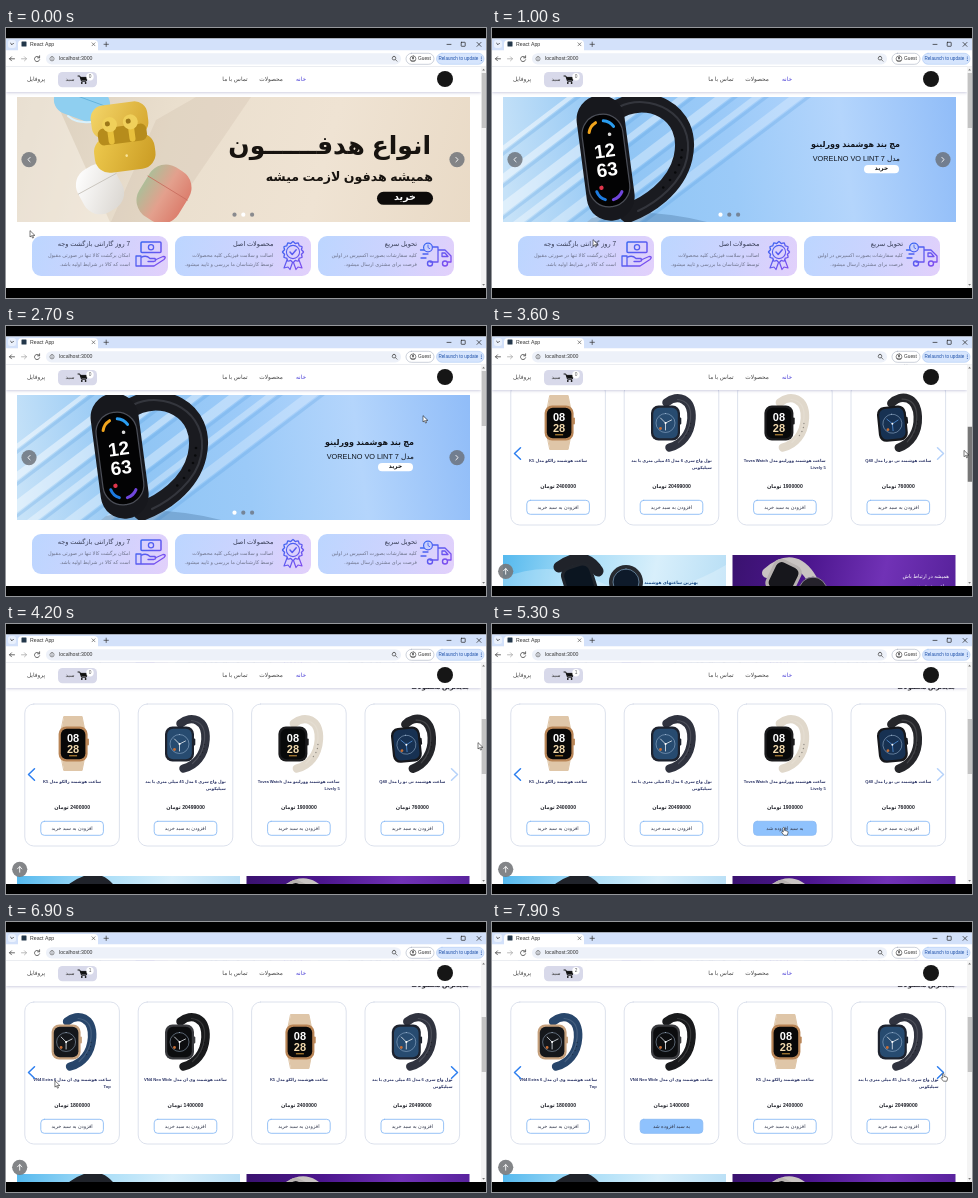
An HTML page with a canvas for the animation above (8000 ms loop, 480 by 270 pixels).

```html
<!DOCTYPE html>
<html lang="fa">
<head>
<meta charset="utf-8">
<title>React App</title>
<style>
html, body { margin: 0; width: 100%; height: 100%; overflow: hidden; background: #000; }
canvas { display: block; width: 480px; height: 270px; }
</style>
</head>
<body>
<canvas id="stage"></canvas>
<script>
const LOOP = 8000, STEP = 100, PITCH = 113.4;
const SANS = "'Liberation Sans', 'DejaVu Sans', sans-serif";
const canvas = document.getElementById('stage');
const c = canvas.getContext('2d');
const dpr = window.devicePixelRatio || 1;
canvas.width = 480 * dpr;
canvas.height = 270 * dpr;

// ---------- helpers ----------
const clamp = v => Math.max(0, Math.min(1, v));
const span = (t, a, b) => clamp((t - a) / (b - a));
const easeOut = p => 1 - Math.pow(1 - p, 2.1);
const smooth = p => p * p * (3 - 2 * p);

function track(keys, t) {
  let i = 0;
  while (i < keys.length - 2 && t >= keys[i + 1][0]) i++;
  const [a, b] = [keys[i], keys[i + 1]];
  const p = smooth(span(t, a[0], b[0]));
  return a.slice(1).map((v, k) => v + (b[k + 1] - v) * p);
}
function rect(x, y, w, h, fill) { c.fillStyle = fill; c.fillRect(x, y, w, h); }
function round(x, y, w, h, r, fill, stroke, lw = 0.8) {
  c.beginPath();
  c.roundRect(x, y, w, h, r);
  if (fill) { c.fillStyle = fill; c.fill(); }
  if (stroke) { c.strokeStyle = stroke; c.lineWidth = lw; c.stroke(); }
}
function disc(x, y, r, fill, stroke, lw = 0.8) { round(x - r, y - r, 2 * r, 2 * r, r, fill, stroke, lw); }
function path(d, stroke, lw, fill) {
  const p = new Path2D(d);
  if (fill) { c.fillStyle = fill; c.fill(p); }
  if (stroke) {
    c.strokeStyle = stroke; c.lineWidth = lw;
    c.lineCap = c.lineJoin = 'round';
    c.stroke(p);
  }
}
function text(s, x, y, size, color, align = 'center', weight = 400, dir = 'rtl') {
  c.font = `${weight} ${size}px ${SANS}`;
  c.direction = dir;
  c.textAlign = align;
  c.textBaseline = 'middle';
  c.fillStyle = color;
  c.fillText(s, x, y);
  return c.measureText(s).width;
}
function ramp(x0, y0, x1, y1, ...colors) {
  const g = c.createLinearGradient(x0, y0, x1, y1);
  colors.forEach((k, i) => g.addColorStop(i / (colors.length - 1), k));
  return g;
}
function at(x, y, angle, draw) {
  c.save();
  c.translate(x, y);
  c.rotate(angle);
  draw();
  c.restore();
}
function clipTo(x, y, w, h, draw) {
  c.save();
  c.beginPath();
  c.rect(x, y, w, h);
  c.clip();
  draw();
  c.restore();
}
function chevron(x, y, w, h, dir, color, lw) {
  path(`M${x + dir * -w / 2} ${y - h / 2}L${x + dir * w / 2} ${y}L${x + dir * -w / 2} ${y + h / 2}`, color, lw);
}

// ---------- browser ----------
function browser(scroll, dragging) {
  rect(0, 0, 480, 10.5, '#000');
  rect(0, 260, 480, 10, '#000');
  rect(0, 10.5, 480, 12, '#d3e1fa');
  round(2, 12, 8, 8, 2.5, '#eaf1fd');
  path('M4.6 15.3L6 16.7L7.4 15.3', '#222', 0.8);
  round(12, 12, 80, 12, [4, 4, 0, 0], '#fff');
  round(15.5, 13.5, 5, 5, 0.5, '#23374a');
  text('React App', 24, 16.4, 5.2, '#333', 'left', 400, 'ltr');
  path('M86 14.8l3 3m0 -3l-3 3', '#444', 0.6);
  path('M98 16.3h4.4m-2.2 -2.2v4.4', '#333', 0.7);
  path('M441 16.4h4', '#222', 0.7);
  round(455.2, 14.3, 4, 4, 0.4, null, '#222', 0.7);
  path('M471 14.4l4 4m0 -4l-4 4', '#222', 0.7);

  rect(0, 22.5, 480, 16, '#fff');
  path('M8.5 30.8h-5m2 -2l-2 2l2 2', '#444', 0.8);
  path('M15.5 30.8h5m-2 -2l2 2l-2 2', '#aaa', 0.8);
  path('M33.2 29.4a2.6 2.6 0 1 0 .4 2.4M33.6 27.8v2h-2', '#444', 0.8);
  round(40, 25.2, 355, 11.3, 5.6, '#edf1f9');
  disc(46, 30.8, 2.1, null, '#555', 0.6);
  path('M46 30.6v1.2', '#555', 0.6);
  text('localhost:3000', 53, 31, 5.2, '#333', 'left', 400, 'ltr');
  disc(388, 30.2, 1.8, null, '#444', 0.7);
  path('M389.4 31.6l1.6 1.6', '#444', 0.7);
  round(400, 25.3, 28, 11, 5.5, '#fff', '#aab2c2', 0.6);
  disc(407, 30.8, 2.9, null, '#333', 0.6);
  disc(407, 30, 0.9, '#333');
  path('M405.3 32.6q1.7 -1.5 3.4 0', '#333', 0.6);
  text('Guest', 412, 31, 4.8, '#333', 'left', 400, 'ltr');
  round(430.5, 25.3, 47.5, 11, 5.5, '#d6e5fd', '#9fc0f2', 0.5);
  text('Relaunch to update', 432.5, 31, 4.6, '#1c4fa8', 'left', 400, 'ltr');
  for (let i = -1; i < 2; i++) disc(475.3, 30.8 + i * 1.7, 0.5, '#1c4fa8');
  rect(0, 38, 480, 0.6, '#dfe3ea');

  rect(475, 38.5, 5, 221.5, '#f4f4f4');
  path('M476.2 42.6l1.4 -1.8l1.4 1.8z', null, 0, '#777');
  path('M476.2 256l1.4 1.8l1.4 -1.8z', null, 0, '#777');
  rect(475.7, 45 + scroll / 4, 4.3, 55, dragging ? '#777' : '#c3c3c3');
}

function navBar(count) {
  c.save();
  c.shadowColor = 'rgba(70,70,140,.35)';
  c.shadowBlur = 3 * dpr;
  c.shadowOffsetY = dpr;
  rect(0, 38.6, 475, 25.4, '#fff');
  c.restore();
  text('پروفایل', 30, 51, 5.8, '#444');
  round(52, 44, 39, 15.2, 4.5, '#d8d9ea');
  text('سبد', 64, 51.3, 5.4, '#333');
  path('M72 48h1.8l1.7 5.2h4.6l1.5 -3.8h-7.2', '#111', 1);
  path('M74.6 49.6h6.4l-1 2.8h-4.6z', null, 0, '#111');
  disc(75.8, 55, 0.9, '#111');
  disc(79.6, 55, 0.9, '#111');
  disc(84, 48.8, 3.7, '#fff');
  text(String(count), 84, 49.1, 4.8, '#555', 'center', 400, 'ltr');
  text('تماس با ما', 229, 51, 5.8, '#444');
  text('محصولات', 265, 51, 5.8, '#444');
  text('خانه', 295, 51, 5.8, '#4a3fd6');
  disc(439, 51, 8, '#161616');
}

// ---------- hero ----------
function earbudCase(x, y, angle, w, h, color, lid) {
  at(x, y, angle, () => {
    round(-w / 2, -h / 2, w, h, Math.min(w, h) * 0.42, color);
    path(`M${-w / 2} ${-h * 0.12}h${w}`, lid, 0.8);
  });
}
function earbudSlide() {
  rect(11, 69, 453, 125, ramp(11, 69, 464, 194, '#d9cdbb', '#eadfce', '#efe3d3', '#e9dac6'));
  path('M11 69H48L104 194H11z', null, 0, 'rgba(255,250,242,.4)');
  path('M150 92L190 69H245L160 194H105z', null, 0, 'rgba(190,172,148,.2)');
  earbudCase(76, 74, 0.35, 56, 34, '#8fcff0', '#5fb0da');
  path('M62 88q10 9 29 5', '#d9f1fc', 2);
  earbudCase(94, 161, -0.5, 43, 49, ramp(-20, -20, 20, 24, '#fff', '#d8d4ce'), '#c5c0b9');
  earbudCase(158, 166, 0.55, 46, 58, ramp(-23, 0, 23, 0, '#aebd98', '#e3a08d', '#dc7f6e'), '#c96f60');
  at(117, 115, -0.13, () => {
    round(-30, -8, 61, 36, 15, ramp(-30, 0, 30, 30, '#edc84c', '#c99a22'));
    round(-29, -40, 57, 34, 13, ramp(-29, -40, 28, -4, '#f4d66a', '#d4a52d'));
    round(-24, -17, 49, 17, 6, '#b68c1c');
    for (const x of [-11, 10]) {
      round(x - 3, -18, 6, 18, 3, '#e8c03c');
      disc(x, -20, 7.5, '#f0d05a');
      disc(x - 2, -21, 2.5, '#9c7719');
    }
    disc(2, 13, 1.3, '#f9e59a');
  });
  text('انواع هدفــــــون', 425, 119, 25, '#17130f', 'right', 700);
  text('همیشه هدفون لازمت میشه', 427, 150, 12.6, '#17130f', 'right', 700);
  round(371, 163.8, 56, 13, 6.5, '#0d0b0a');
  text('خرید', 399, 169.6, 9.5, '#fff', 'center', 700);
}
function bandSlide() {
  rect(11, 69, 453, 125, ramp(11, 150, 464, 90, '#c6e2f8', '#8fc5f4', '#9bcaf8', '#b4d5fc', '#91bdf8'));
  for (let i = 0; i < 7; i++) {
    const x = 75 + i * 37, w = 7 + (i * 5) % 11;
    path(`M${x} 69h${w}L${x + w - 165} 194h${-w}z`, null, 0, `rgba(255,255,255,${0.5 - i * 0.04})`);
    path(`M${x + w + 2} 69h5L${x + w - 158} 194h-5z`, null, 0, 'rgba(70,145,220,.22)');
  }
  path('M100 190Q150 178 215 194H95z', null, 0, 'rgba(40,80,120,.25)');
  path('M122 84C152 62 202 82 191 130C184 160 155 178 136 185', '#1a1b20', 19);
  path('M127 79C156 64 204 84 195 130C190 155 165 174 146 183', '#34363d', 2);
  for (let i = 0; i < 6; i++) disc(190 - i * i * 0.75, 122 + i * 7.5, 1.3, '#08090b');
  at(114, 133, -0.13, () => {
    round(-24, -66, 48, 126, 24, '#17181d');
    round(-20.5, -47, 41, 93, 20, '#030304', '#4b4e57', 1.2);
    c.lineCap = 'round';
    for (const [a, k] of [[3.4, '#f2a51d'], [4.9, '#2a9df0'], [0.5, '#7046dc'], [2, '#1d7be0']]) {
      c.beginPath();
      c.arc(0, a > 3 ? -27 : 26, 13.5, a, a + 0.9);
      c.strokeStyle = k; c.lineWidth = 3; c.stroke();
    }
    text('12', 0, -9, 19, '#fff', 'center', 700, 'ltr');
    text('63', 0, 10, 19, '#fff', 'center', 700, 'ltr');
    disc(-8, 26, 2.2, '#e0364c');
    disc(7, -26, 1.8, '#d8d8d8');
  });
  text('مچ بند هوشمند وورلینو', 408, 117, 8, '#10151d', 'right', 700);
  text('مدل VORELNO VO LINT 7', 408, 131, 7.3, '#10151d', 'right');
  round(372, 137, 35, 8.3, 4.1, '#fff');
  text('خرید', 389.5, 140.8, 5.8, '#111', 'center', 700);
}
function hero(t) {
  const p = easeOut(span(t, 40, 200));
  clipTo(11, 69, 453, 125, () => {
    c.save();
    c.translate(453 * p, 0);
    if (p < 1) earbudSlide();
    c.translate(-453, 0);
    if (p > 0) bandSlide();
    c.restore();
  });
  for (const [x, dir] of [[23, -1], [451, 1]]) {
    disc(x, 131.6, 7.6, 'rgba(105,110,118,.8)');
    chevron(x, 131.6, 2.2, 4.4, dir, '#fff', 0.9);
  }
  const active = t < 100 ? 1 : 0;
  for (let i = 0; i < 3; i++) disc(228.5 + i * 8.8, 186.7, 2.1, i === active ? '#fff' : 'rgba(105,110,120,.75)');
}

// ---------- service cards ----------
function moneyIcon(ink) {
  round(135, 214, 20, 10.5, 1, null, ink, 1.5);
  disc(145, 219.2, 2.6, null, ink, 1.3);
  path('M130 228h5v10h-5zM135 229.5q5 -3 9 1h5q2 2 -1 3h-6M149 232l8 -3.5q4 0 1 3l-10 6.5h-13', ink, 1.3);
}
function medalIcon(ink) {
  path('M281 232l-3 8l4 -1l2 2.5l2.5 -7M293 232l3 8l-4 -1l-2 2.5l-2.5 -7', ink, 1.2);
  c.beginPath();
  for (let i = 0; i <= 48; i++) {
    const a = i / 48 * Math.PI * 2, r = 9.6 + 0.9 * Math.cos(a * 12);
    c.lineTo(287 + r * Math.cos(a), 224 + r * Math.sin(a));
  }
  c.strokeStyle = ink; c.lineWidth = 1.3; c.stroke();
  disc(287, 224, 6.6, null, ink, 1.1);
  path('M284 224l2.2 2.4l4 -4.6', ink, 1.5);
}
function truckIcon(ink) {
  path('M422 219h10v15h-8M432 222h7l6 6v6h-3M436 225h3l3 3.5h-6zM414.5 222h8M417 226h5M415 230h5', ink, 1.3);
  disc(424, 235.5, 2.5, null, ink, 1.4);
  disc(439, 235.5, 2.5, null, ink, 1.4);
  disc(422, 219.5, 4.4, '#c9cffc', ink, 1.2);
  path('M422 217v2.6l1.7 1', ink, 0.9);
}
function service(x, right, icon, title, lines) {
  round(x, 208, 136, 40, 9, ramp(x, 208, x + 136, 248, '#bcd6ff', '#ccd3fe', '#e2d0fb'));
  icon(ramp(x + 104, 212, x + 134, 240, '#2f6cf2', '#8a48ee'));
  text(title, right, 216, 6.5, '#343a52', 'right');
  lines.forEach((s, i) => text(s, right, 227.6 + i * 8.6, 5, '#6b7088', 'right'));
}
function services() {
  service(26, 124, moneyIcon, '7 روز گارانتی بازگشت وجه',
    ['امکان برگشت کالا تنها در صورتی مقبول', 'است که کالا در شرایط اولیه باشد.']);
  service(169, 267.5, medalIcon, 'محصولات اصل',
    ['اصالت و سلامت فیزیکی کلیه محصولات', 'توسط کارشناسان ما بررسی و تایید میشود.']);
  service(312, 411, truckIcon, 'تحویل سریع',
    ['کلیه سفارشات بصورت اکسپرس در اولین', 'فرصت برای مشتری ارسال میشود.']);
}

// ---------- products ----------
const products = [
  { title: ['ساعت هوشمند تی نو را مدل Q40'], price: 760000, strap: '#25262a', shell: '#17181c', face: '#173152', tilt: -0.1, loop: 1 },
  { title: ['ساعت هوشمند وورلینو مدل Tovra Watch', '5 Lively'], price: 1900000, strap: '#e0d8cb', shell: '#1b1b1d', face: '#08090a', loop: 1, digits: 1, added: 5200 },
  { title: ['نول واچ سری 6 مدل 45 میلی متری با بند', 'سیلیکونی'], price: 20499000, strap: '#30333f', shell: '#1d222e', face: '#274b70', loop: 1, hands: 1 },
  { title: ['ساعت هوشمند زالکو مدل K5'], price: 2400000, strap: '#dfc6a8', shell: '#b98556', face: '#080808', digits: 1 },
  { title: ['ساعت هوشمند وی ان مدل VN4 Neo Wide'], price: 1400000, strap: '#191a1c', shell: '#3a3b3f', face: '#0c0d0f', loop: 1, hands: 1, added: 7300 },
  { title: ['ساعت هوشمند وی ان مدل VN4 Extra 6', 'Top'], price: 1800000, strap: '#28466b', shell: '#c5a07c', face: '#15171b', loop: 1, hands: 1 }
];
function watch(x, y, p) {
  at(x, y, p.tilt || 0, () => {
    if (p.loop) {
      path('M-6 -20C5 -29 20 -24 19 -4C18 12 9 22 -3 25', p.strap, 8.5);
      path('M5 -23C15 -22 19 -15 18 -4C17 8 12 15 6 20', 'rgba(255,255,255,.13)', 1.2);
      for (let i = 0; i < 4; i++) disc(18 - i * i * 0.5, 1 + i * 4, 0.7, 'rgba(0,0,0,.35)');
    } else {
      path('M-9 -27H9L12 -12H-12zM-12 12H12L9 27H-9z', p.strap, 1, p.strap);
    }
    const sx = p.loop ? -7 : 0;
    round(sx - 14.5, -17, 29, 35, 7.5, p.shell);
    round(sx + 13.8, -5, 2, 7, 1, p.shell);
    round(sx - 12.3, -14.8, 24.6, 30.6, 6, p.face);
    if (p.digits) {
      text('08', sx, -4.5, 11, '#fff', 'center', 700, 'ltr');
      text('28', sx, 6.2, 11, '#f1d9ad', 'center', 700, 'ltr');
      rect(sx - 4, 11.8, 8, 1, '#d59a3e');
    } else {
      disc(sx, 0.5, 9.5, null, 'rgba(190,215,240,.6)', 0.7);
      path(`M${sx} .5l-5 -5M${sx} .5l6 -3M${sx} .5v7`, p.hands ? '#e8edf2' : '#4f8dd6', 0.8);
      disc(sx, 0.5, 1, '#fff');
      disc(sx - 5, 6, 1.4, '#c76e35');
    }
  });
}
function card(x, p, t) {
  const mid = x + 47.3;
  round(x, 280, 94.6, 142, 9, '#fff', '#d9deea', 0.9);
  watch(mid + 1, 319.5, p);
  const w = text(p.title[0], mid, 357.4, 4.15, '#2b3466', 'center', 700);
  if (p.title[1]) text(p.title[1], mid + w / 2, 364.4, 4.15, '#2b3466', 'right', 700);
  text(`${p.price} تومان`, mid, 383.3, 5.1, '#22242c', 'center', 700);
  const done = p.added && t >= p.added;
  round(x + 16, 397.3, 62.6, 14, 3.5, done ? '#8fc2fd' : '#fff', '#8cbcf5', 0.9);
  text(done ? 'به سبد افزوده شد' : 'افزودن به سبد خرید', mid, 404.4, 5, '#30364a');
}
function carousel(t) {
  text('جدیدترین محصولات', 464, 263, 6.2, '#222', 'right', 700);
  const shift = PITCH * (easeOut(span(t, 6100, 6400)) + easeOut(span(t, 6550, 6850)));
  clipTo(18, 278, 438, 148, () => {
    products.forEach((p, i) => {
      const x = 359 - i * PITCH + shift;
      if (x > -96 && x < 460) card(x, p, t);
    });
  });
  chevron(25.5, 350.5, 6, 11.5, -1, '#2d7ff0', 1.5);
  chevron(448.5, 350.5, 6, 11.5, 1, t < 6100 ? 'rgba(45,127,240,.35)' : '#2d7ff0', 1.5);
}
function banners() {
  clipTo(11, 452, 223, 60, () => {
    rect(11, 452, 223, 60, ramp(11, 452, 234, 500, '#55b9ee', '#a5dcf7', '#d8effb', '#b7def5'));
    path('M11 475Q60 455 110 480T234 462V512H11z', null, 0, 'rgba(255,255,255,.25)');
    path('M67 464Q92 446 106 468', '#20232a', 11);
    at(87, 478, -0.3, () => { round(-16, -17, 32, 38, 9, '#20242b'); round(-13, -14, 26, 32, 7, '#0b1520'); });
    disc(134, 479, 17, '#272a30');
    disc(134, 479, 13, '#0e1a2a', '#6f8faa', 0.8);
    text('بهترین ساعتهای هوشمند', 206, 480, 4.4, '#174a86', 'right', 700);
  });
  clipTo(240.5, 452, 223, 60, () => {
    rect(240, 452, 224, 60, ramp(240, 452, 464, 500, '#3a126f', '#4c168e', '#7132b6', '#56219a'));
    path('M275 470Q302 446 320 476', '#c9c4c2', 10);
    at(292, 474, 0.45, () => { round(-15, -16, 30, 34, 8, '#b7b2b0'); round(-12, -13, 24, 28, 6, '#17171c'); });
    disc(321, 488, 14, '#25222b', '#8b8396', 1);
    text('همیشه در ارتباط باش', 457, 474, 5.2, '#fff', 'right');
    text('ساعت هوشمند', 457, 484, 5.2, '#e6d8fa', 'right');
  });
}

// ---------- pointer ----------
const pointerPath = [
  [0, 24, 203], [800, 24, 203], [1000, 101, 212], [1400, 101, 212], [1800, 23, 135], [1900, 23, 135],
  [2100, 200, 150], [2250, 200, 150], [2600, 417, 90], [2750, 417, 90], [3100, 472, 69], [3150, 472, 69]
];
const clickPath = [
  [4250, 472, 119], [4900, 290, 203], [5650, 290, 203], [6050, 25, 151], [6800, 25, 151],
  [7200, 178, 203], [7400, 178, 203], [7900, 449.5, 151], [8000, 449.5, 151]
];
const scrollPath = [[3150, 0], [3600, 223], [3750, 223], [4150, 200], [8000, 200]];

function pointer(t, scroll) {
  const [x, y] = t < 3150 ? track(pointerPath, t)
    : t < 4250 ? [472, 69 + scroll / 4] : track(clickPath, t);
  const hand = (t >= 1800 && t <= 1900) || (t >= 4900 && t <= 5650) || (t >= 6050 && t <= 6800) ||
    (t >= 7200 && t <= 7400) || t >= 7900;
  c.save();
  c.translate(x, y);
  if (hand) path('M1 .8q.8 -1 1.5 0v2.6l3 .8q.8 .4 .5 1.6l-.7 2.4h-3.4l-2.4 -3q0 -1 1.5 -.4z', '#222', 0.6, '#fff');
  else path('M0 0v6l1.5 -1.3l1.1 2.4l1 -.5l-1 -2.2h1.9z', '#222', 0.6, '#fff');
  c.restore();
}

// ---------- scene ----------
function draw(t) {
  const scroll = track(scrollPath, t)[0];
  c.setTransform(dpr, 0, 0, dpr, 0, 0);
  rect(0, 0, 480, 270, '#fff');
  clipTo(0, 38.5, 475, 221.5, () => {
    c.save();
    c.translate(0, -scroll);
    hero(t);
    services();
    carousel(t);
    banners();
    c.restore();
    navBar(products.filter(p => p.added && t >= p.added).length);
    if (scroll > 20) {
      disc(13.7, 245.3, 7.6, 'rgba(118,120,124,.9)');
      path('M13.7 248.2v-5.6m-2.2 2.2l2.2 -2.2l2.2 2.2', '#fff', 0.9);
    }
  });
  browser(scroll, t >= 3150 && t < 4150);
  pointer(t, scroll);
}
function frame() {
  const t = performance.now() % LOOP;
  draw(Math.floor(t / STEP) * STEP);
  requestAnimationFrame(frame);
}
frame();
</script>
</body>
</html>
```
